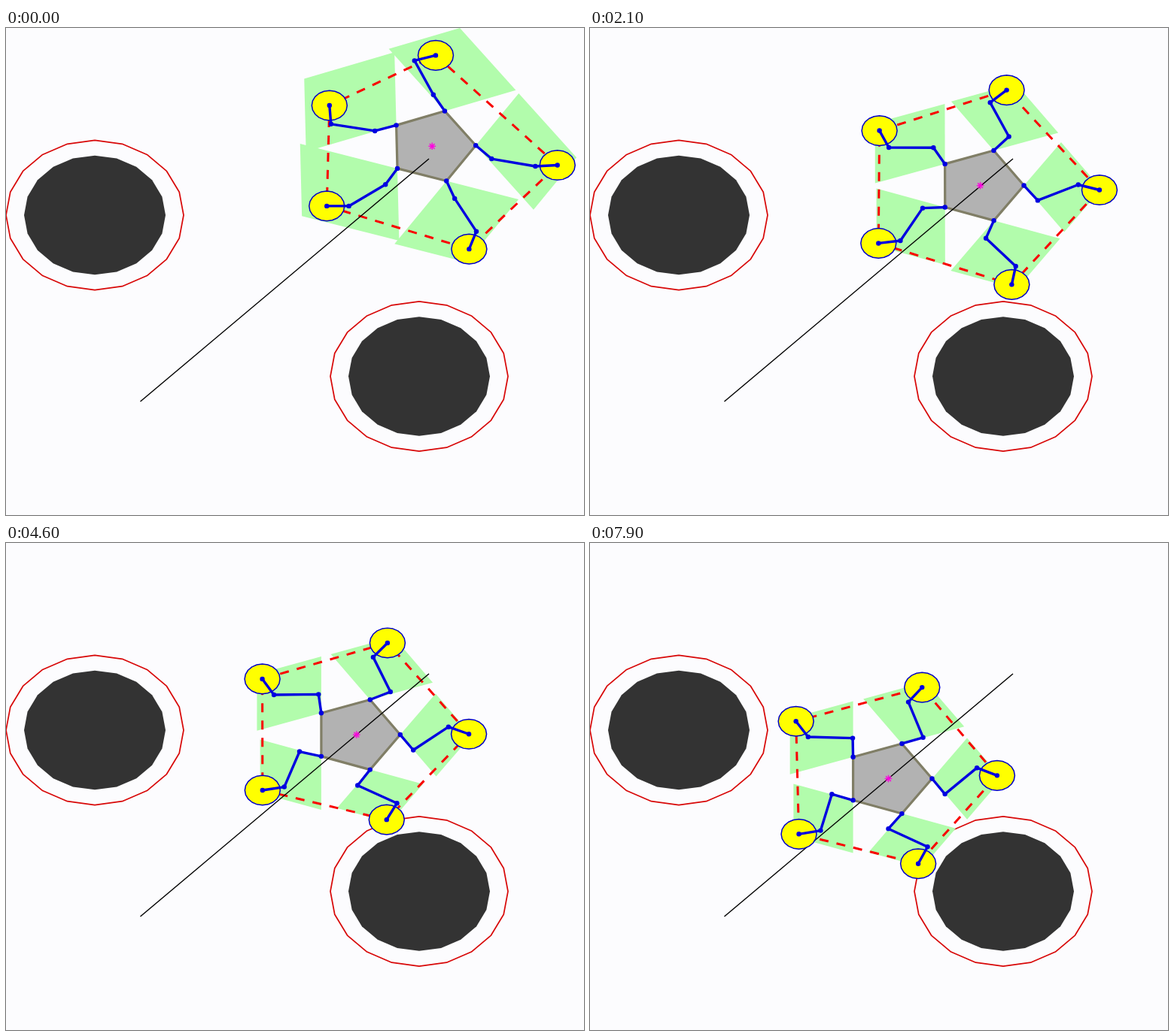
Write an HTML page with a canvas that moves like this. It is 768 px wide and 648 px high and loops after 8 s.

```html
<!DOCTYPE html>
<html lang="en">
<head>
<meta charset="utf-8">
<title>Five-legged walker</title>
<style>
html, body { margin: 0; width: 100%; height: 100%; overflow: hidden; background: #fcfcfe; }
canvas { display: block; }
</style>
</head>
<body>
<canvas id="stage" width="768" height="648"></canvas>
<script>
const ctx = document.getElementById('stage').getContext('2d');
const LOOP = 8000, STEP = 100;
const ASPECT = 1.185; // plot units are wider than tall
const HIP_LINK = 29.8, SHIN = 59.3, TOE = 29.4;
const BODY_R = 58, FOOT_R = 23.5;
const RING_R = 118, CORE_R = 94, CLEARANCE = 121;
const OBSTACLES = [[118, 249], [549, 463.5]];

// Headings in degrees (hip, knee, ankle) relax from one pose to another;
// drift turns the shin slowly. The working area shrinks from wide to rest.
const LEGS = [
  { face: 0, from: [45, 11.5, -3.5], to: [55, -36, 24.5], drift: -1.1, wide: [100, 127], rest: 79 },
  { face: -72, from: [-120.5, -115, -16.5], to: [-18, -118, -52], drift: 1.1, wide: [123, 100], rest: 87 },
  { face: -144, from: [162.5, 190.5, 266], to: [270, 173, 236.5], drift: 1.1, wide: [127, 115], rest: 88 },
  { face: 144, from: [122, 145, 180], to: [199.5, 113, 169], drift: -1.1, wide: [114, 135], rest: 83 },
  { face: 72, from: [68.5, 61, 109], to: [127.5, 43, 97], drift: 0, wide: [100, 121], rest: 90 }
];

const relax = (from, to, t, tau) => to + (from - to) * Math.exp(-t / tau);

function polar([x, y], r, deg) {
  const a = deg * Math.PI / 180;
  return [x + r * Math.cos(a), y + r * Math.sin(a) / ASPECT];
}

function trace(points, close) {
  ctx.beginPath();
  points.forEach(p => ctx.lineTo(p[0], p[1]));
  if (close) ctx.closePath();
}

function fill(points, color) {
  trace(points, true);
  ctx.fillStyle = color;
  ctx.fill();
}

function stroke(points, color, width, close) {
  trace(points, close);
  ctx.strokeStyle = color;
  ctx.lineWidth = width;
  ctx.stroke();
}

const ring = (c, r) => Array.from({ length: 20 }, (_, i) => polar(c, r, i * 18));

function dot([x, y], r, color) {
  ctx.beginPath();
  ctx.arc(x, y, r, 0, 2 * Math.PI);
  ctx.fillStyle = color;
  ctx.fill();
}

function star([x, y]) {
  for (let i = 0; i < 4; i++) {
    const a = i * Math.PI / 4, dx = 4.8 * Math.cos(a), dy = 4.8 * Math.sin(a);
    stroke([[x - dx, y - dy], [x + dx, y + dy]], '#ff00e0', 1.4);
  }
}

// How far a foot must rise to stand clear above an obstacle.
function liftFor([x, y]) {
  return Math.max(0, ...OBSTACLES.map(([ox, oy]) => {
    const dx = x - ox;
    if (Math.abs(dx) >= CLEARANCE || y > oy) return 0;
    return y - oy + Math.sqrt(CLEARANCE ** 2 - dx ** 2) / ASPECT;
  }));
}

// Ankle that joins a given knee and foot.
function solveAnkle(knee, foot) {
  const dx = foot[0] - knee[0], dy = (foot[1] - knee[1]) * ASPECT;
  const d = Math.min(Math.hypot(dx, dy), SHIN + TOE);
  const bend = Math.acos((SHIN ** 2 + d ** 2 - TOE ** 2) / (2 * SHIN * d));
  return polar(knee, SHIN, (Math.atan2(dy, dx) - bend) * 180 / Math.PI);
}

function buildLeg(leg, center, turn, t) {
  const [h, k, a] = leg.from.map((deg, i) => relax(deg, leg.to[i], t, 1.68));
  const face = leg.face + turn;
  const hip = polar(center, BODY_R, face);
  const knee = polar(hip, HIP_LINK, h);
  let ankle = polar(knee, SHIN, k + leg.drift * t);
  let foot = polar(ankle, TOE, a);

  const lift = liftFor(foot);
  if (lift > 0) {
    foot = [foot[0], foot[1] - lift];
    ankle = solveAnkle(knee, foot);
  }

  const [p, q] = leg.wide.map((wide, i) =>
    polar(hip, relax(wide, leg.rest, t, 1.5) - 1.2 * lift, face + (i ? 54 : -54)));
  const area = [hip, p, [p[0] + q[0] - hip[0], p[1] + q[1] - hip[1]], q];
  return { hip, foot, area, joints: [hip, knee, ankle, foot] };
}

function draw(t) {
  const lag = Math.exp(-t / 0.816);
  const center = [562.4 - 21 * t + 3.8 * lag, 173.7 + 17.7 * t - 16.4 * lag];
  const legs = LEGS.map(leg => buildLeg(leg, center, -1.2 * lag, t));

  ctx.fillStyle = '#fcfcfe';
  ctx.fillRect(0, 0, 768, 648);
  ctx.lineJoin = 'round';
  OBSTACLES.forEach(c => {
    stroke(ring(c, RING_R), '#d80808', 1.7, true);
    fill(ring(c, CORE_R), '#333333');
  });

  legs.forEach(leg => fill(leg.area, '#b2fcac'));
  ctx.setLineDash([12, 11]);
  stroke(legs.map(leg => leg.foot), '#f80000', 3, true);
  ctx.setLineDash([]);

  const hips = legs.map(leg => leg.hip);
  fill(hips, '#b2b2b2');
  stroke(hips, '#807e66', 3.2, true);
  stroke([[562, 174], [178.5, 497]], '#000', 1.4);
  star(center);

  legs.forEach(({ foot }) => {
    fill(ring(foot, FOOT_R), '#ffff00');
    stroke(ring(foot, FOOT_R), '#0000c8', 1.5, true);
  });
  legs.forEach(({ joints }) => {
    stroke(joints, '#0000e0', 3.4);
    joints.forEach(p => dot(p, 3.2, '#0000e0'));
  });
}

const start = performance.now();
function frame() {
  const ms = Math.max(0, performance.now() - start) % LOOP;
  draw(Math.floor(ms / STEP) * STEP / 1000);
  requestAnimationFrame(frame);
}
frame();
</script>
</body>
</html>
```
